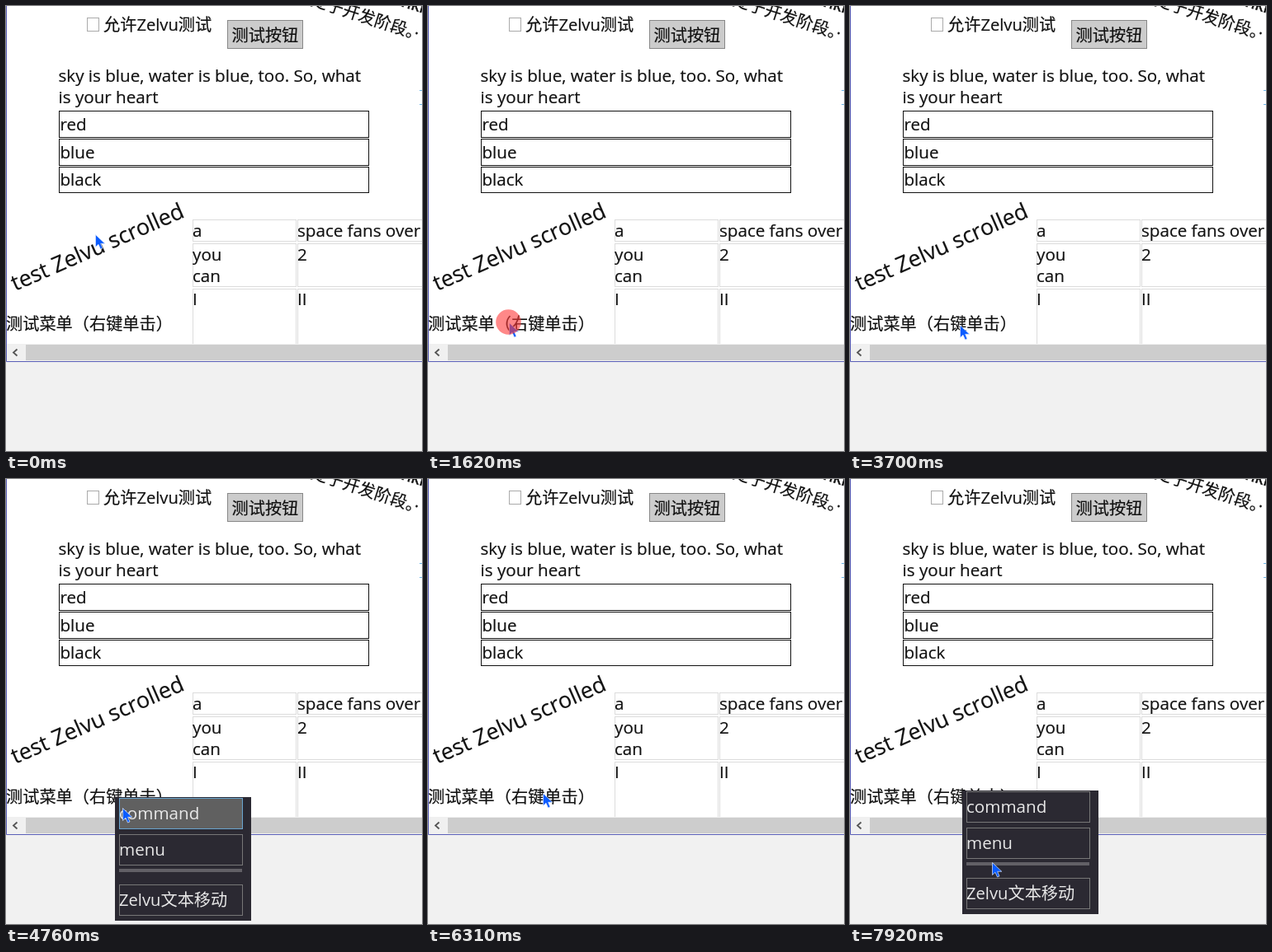
These frames come from a looping animation (504x540 px, 7990 ms). An HTML page:

```html
<!DOCTYPE html>
<html lang="zh-CN">
<head>
<meta charset="utf-8">
<style>
html, body { margin: 0; width: 100%; height: 100%; overflow: hidden; background: #f1f1f1; }
svg { display: block; width: 504px; height: 540px; }
text {
  font: 20.2px "Open Sans", "Noto Sans", "Noto Sans CJK SC", "Noto Sans CJK", sans-serif;
  fill: #111; stroke: #111; stroke-width: .2; white-space: pre;
}
.latin text, text.latin { font-size: 20.6px; }
.cells { fill: none; stroke: #dcdcdc; }
.list { fill: #fff; stroke: #111; }
#menu text { fill: #e8e8e8; stroke: none; }
.item { fill: none; stroke: #777; }
.item.hover { fill: #606060; stroke: #6aa5cf; }
</style>
</head>
<body>
<svg viewBox="0 0 504 540">
  <rect width="504" height="431" fill="#fff"/>

  <rect x="98.5" y="14.5" width="14" height="16" fill="#fff" stroke="#aaa"/>
  <text x="118" y="30">允许Zelvu测试</text>
  <rect x="268.5" y="17.5" width="91" height="34" fill="#ccc" stroke="#888"/>
  <text x="273.5" y="43">测试按钮</text>
  <text transform="translate(368 -1.5) rotate(18)">处于开发阶段。·</text>
  <text transform="translate(478 0) rotate(18)" style="stroke-width:.6">hki</text>
  <path d="M501 102.5h3M501 119.5h3" stroke="#6cb6e8"/>

  <g class="list">
    <rect x="64.5" y="127.5" width="375" height="32"/>
    <rect x="64.5" y="161.5" width="375" height="32"/>
    <rect x="64.5" y="195.5" width="375" height="31"/>
  </g>
  <g class="cells">
    <rect x="226.5" y="259.5" width="125" height="26"/>
    <rect x="353.5" y="259.5" width="170" height="26"/>
    <rect x="226.5" y="288.5" width="125" height="52"/>
    <rect x="353.5" y="288.5" width="170" height="52"/>
    <rect x="226.5" y="343.5" width="125" height="80"/>
    <rect x="353.5" y="343.5" width="170" height="80"/>
  </g>
  <g class="latin">
    <text x="63.5" y="92">sky is blue, water is blue, too. So, what</text>
    <text x="63.5" y="118">is your heart</text>
    <text x="65.5" y="151">red</text>
    <text x="65.5" y="185">blue</text>
    <text x="65.5" y="218">black</text>
    <text x="226" y="280">a</text>
    <text x="353" y="280">space fans over</text>
    <text x="226" y="309">you</text>
    <text x="226" y="335">can</text>
    <text x="353" y="309">2</text>
    <text x="226" y="363">I</text>
    <text x="353" y="363">II</text>
  </g>
  <text transform="translate(11 346) rotate(-23.6)" style="font-size:26.9px">test Zelvu scrolled</text>
  <text x="0" y="393">测试菜单（右键单击）</text>

  <rect y="410" width="504" height="21" fill="#f0f0f0"/>
  <rect x="24" y="411" width="480" height="19" fill="#cdcdcd"/>
  <path d="M13.5 416.5l-4.5 4 4.5 4" fill="none" stroke="#555" stroke-width="1.8"/>
  <path d="M.5 0V431.5H504" fill="none" stroke="#5a5fb8"/>

  <g id="menu">
    <rect width="165" height="150" fill="#2b2932"/>
    <rect class="item" x="5.5" y="1.5" width="149" height="37"/>
    <rect class="item" x="5.5" y="45.5" width="149" height="37"/>
    <rect x="5" y="87" width="149" height="4" fill="#626066"/>
    <rect class="item" x="5.5" y="106.5" width="149" height="37"/>
    <text class="latin" x="5" y="27">command</text>
    <text class="latin" x="5" y="71">menu</text>
    <text x="5" y="132">Zelvu文本移动</text>
  </g>
  <path id="cursor" d="M.5.5V15.5L4 12.3 6.5 18 9 17 6.7 11.3H11.8Z" fill="#0b5cff" stroke="#dfeaff" stroke-width=".7"/>
  <circle id="click" r="15.3" opacity=".6"/>
</svg>
<script>
const LOOP = 7990;
const start = [108, 277];
// first step, last step, step count, destination
const moves = [
  [70, 830, 12, 98, 384],
  [2280, 2420, 3, 127, 401],
  [3490, 3700, 4, 133, 387],
  [4690, 5100, 7, 172, 450],
  [5700, 6380, 10, 138, 379],
  [7650, 7920, 5, 172, 465]
];
// open, close, x, y
const menus = [
  [1690, 2820, 97, 383],
  [4160, 5430, 132, 386],
  [7110, LOOP, 136, 378]
];
// on, off, colour
const red = '#ff3838', yellow = '#ffff30';
const clicks = [
  [1620, 1820, red],
  [2750, 2880, yellow],
  [4160, 4290, red],
  [5430, 5500, yellow],
  [7110, 7240, red]
];

const $ = id => document.getElementById(id);
const [menu, cursor, click] = ['menu', 'cursor', 'click'].map($);
const items = [...document.querySelectorAll('.item')];
const active = (list, t) => list.find(([from, to]) => t >= from && t < to);
const show = (el, on) => el.setAttribute('visibility', on ? 'visible' : 'hidden');
const place = (el, x, y) => el.setAttribute('transform', `translate(${x} ${y})`);

function pointer(t) {
  let [x, y] = start;
  for (const [from, to, steps, tx, ty] of moves) {
    if (t < from) break;
    const step = Math.floor((t - from) / (to - from) * (steps - 1) + 1e-6) + 1;
    const p = Math.min(1, step / steps);
    const e = p * p * (3 - 2 * p);
    x += (tx - x) * e;
    y += (ty - y) * e;
  }
  return [Math.round(x), Math.round(y)];
}

function draw(t) {
  const [x, y] = pointer(t);
  place(cursor, x, y);

  const open = active(menus, t);
  show(menu, open);
  if (open) {
    const [, , mx, my] = open;
    place(menu, mx, my);
    for (const item of items) {
      const top = item.y.baseVal.value;
      const over = x - mx >= 5 && x - mx <= 155 && y - my >= top && y - my <= top + 37;
      item.classList.toggle('hover', over);
    }
  }

  const press = active(clicks, t);
  show(click, press);
  if (press) {
    place(click, x - .5, y - .5);
    click.setAttribute('fill', press[2]);
  }
}

const begin = performance.now();
function frame() {
  draw((performance.now() - begin) % LOOP);
  requestAnimationFrame(frame);
}
frame();
</script>
</body>
</html>
```
